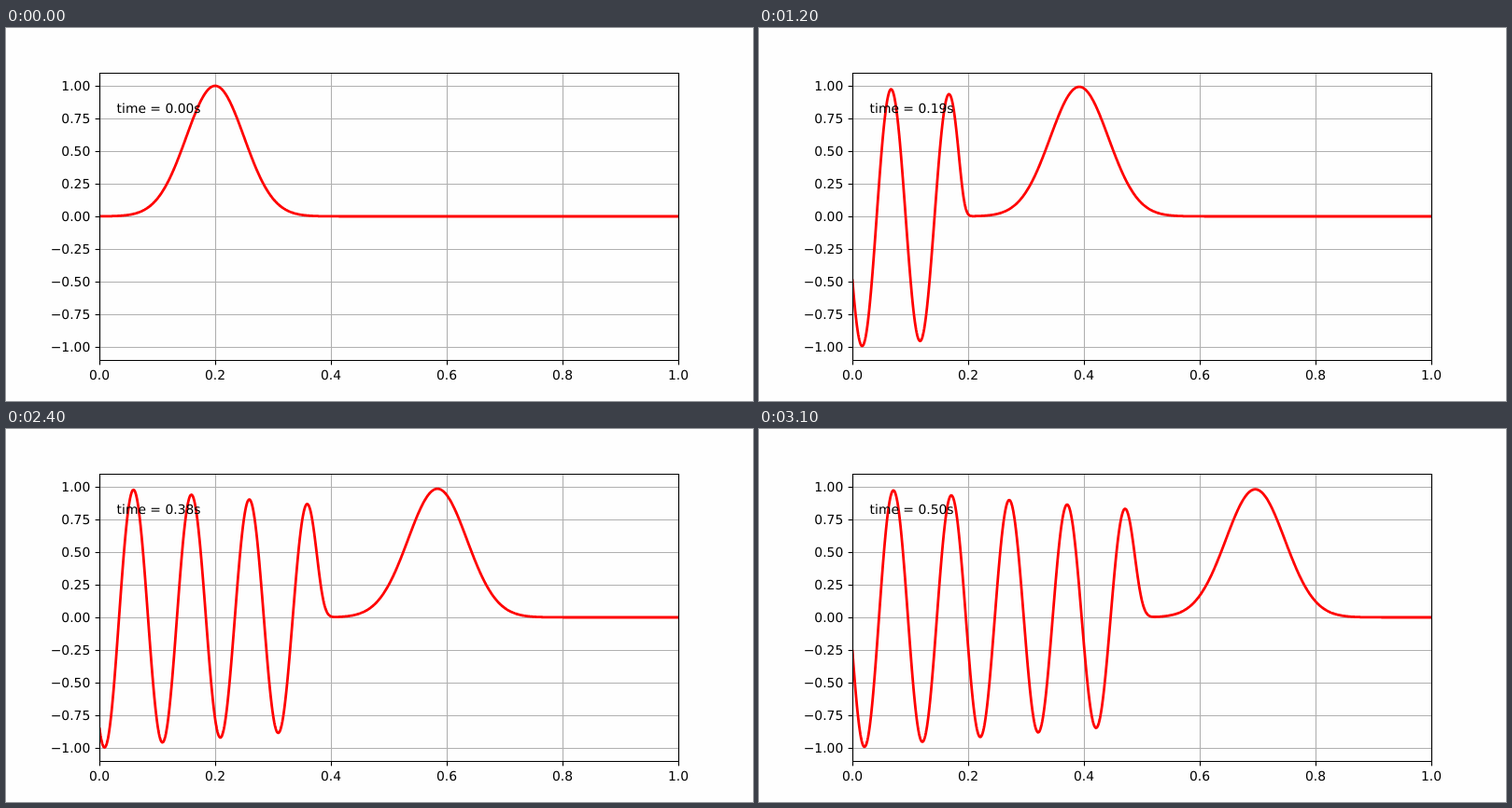
These frames come from a looping animation (800x400 px, 3.2 s). An HTML page:

```html
<!DOCTYPE html>
<html lang="en">
<head>
<meta charset="utf-8">
<title>Advected wave</title>
<style>
  html, body { margin: 0; width: 100%; height: 100%; overflow: hidden; background: #fefefe; }
  svg { display: block; }
  text { font: 13.89px "DejaVu Sans", sans-serif; fill: #000; text-rendering: geometricPrecision; }
  path { fill: none; stroke-width: 1.11; }
  .grid { stroke: #b0b0b0; }
  .axis { stroke: #000; }
  .wave { stroke: #f00; stroke-width: 2.78; stroke-linejoin: round; }
</style>
</head>
<body>
<svg id="plot" width="800" height="400" viewBox="0 0 800 400">
  <clipPath id="area"><rect x="100" y="48" width="620" height="308"/></clipPath>
</svg>
<script>
const FRAMES = 32, FRAME_MS = 100, STEPS = 20;
const CELLS = 1000, DX = 1 / CELLS, DT = 0.0008, COURANT = DT / DX;

const plot = document.getElementById('plot');
const px = x => 100 + 620 * x;
const py = y => 202 - 140 * y;

function add(tag, attrs, text = '') {
  const el = document.createElementNS('http://www.w3.org/2000/svg', tag);
  for (const key in attrs) el.setAttribute(key, attrs[key]);
  el.textContent = text;
  return plot.appendChild(el);
}
const line = (cls, d) => add('path', { class: cls, d });
const label = (x, y, anchor, text) => add('text', { x, y, 'text-anchor': anchor }, text);

// First-order upwind advection, driven by a sine at the left edge
function simulate() {
  const u = Array.from({ length: CELLS + 1 }, (_, i) => Math.exp(-200 * (i * DX - 0.2) ** 2));
  const frames = [];
  for (let n = 0; n < FRAMES; n++) {
    frames.push('M' + u.map((v, i) => px(i * DX).toFixed(2) + ' ' + py(v).toFixed(2)).join('L'));
    for (let s = 1; s <= STEPS; s++) {
      for (let i = CELLS; i > 0; i--) u[i] -= COURANT * (u[i] - u[i - 1]);
      u[0] = Math.sin(20 * Math.PI * (n * STEPS + s) * DT);
    }
  }
  return frames;
}

const xTicks = Array.from({ length: 6 }, (_, i) => i / 5);
const yTicks = Array.from({ length: 9 }, (_, i) => 1 - i / 4);

for (const x of xTicks) line('grid', `M${px(x) + 0.5} 48V356`);
for (const y of yTicks) line('grid', `M100 ${py(y) + 0.5}H720`);

const wave = line('wave', '');
wave.setAttribute('clip-path', 'url(#area)');

for (const x of xTicks) {
  line('axis', `M${px(x) + 0.5} 356.5v4.86`);
  label(px(x), 377, 'middle', x.toFixed(1));
}
for (const y of yTicks) {
  line('axis', `M100.5 ${py(y) + 0.5}h-4.86`);
  label(90.28, py(y) + 5, 'end', y.toFixed(2).replace('-', '\u2212'));
}
line('axis', 'M100.5 48.5H720.5V356.5H100.5Z');
const clock = label(118.6, 91, 'start', '');

const frames = simulate();
let shown = -1;

function show(n) {
  if (n === shown) return;
  shown = n;
  wave.setAttribute('d', frames[n]);
  clock.textContent = `time = ${(n * STEPS * DT).toFixed(2)}s`;
}
function tick() {
  show(Math.floor(performance.now() / FRAME_MS) % FRAMES);
  requestAnimationFrame(tick);
}
tick();
</script>
</body>
</html>
```
